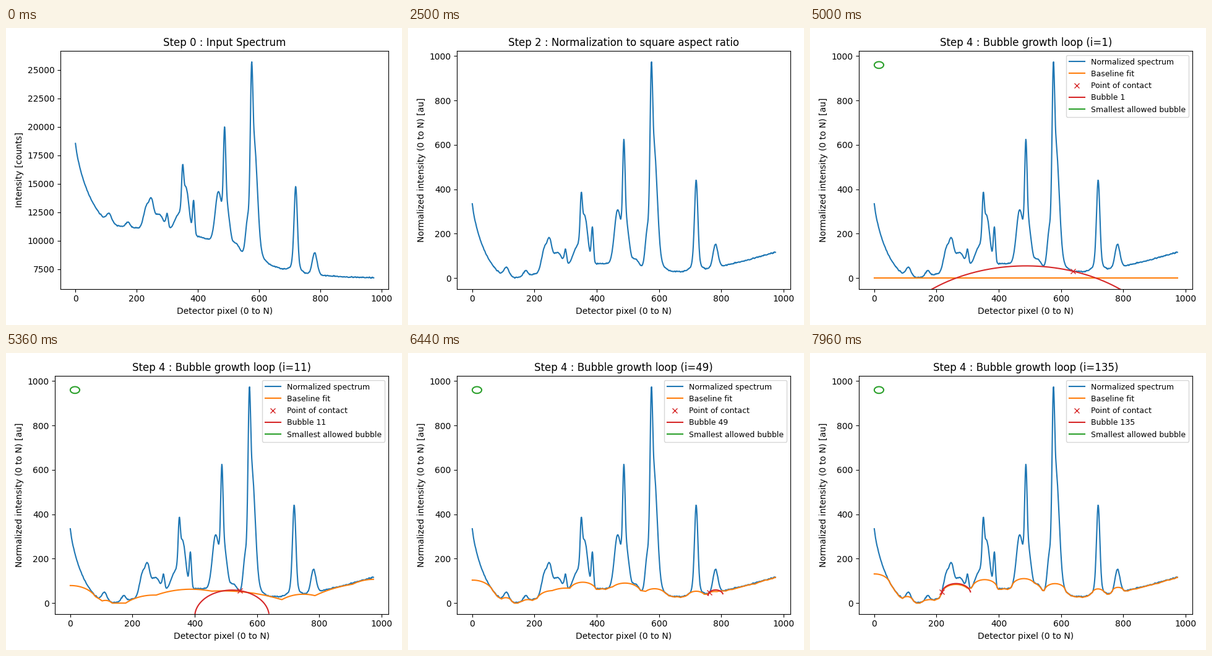
These frames come from a looping animation (640x480 px, 8000 ms). A matplotlib script:

```python
import numpy as np
import matplotlib.pyplot as plt
from matplotlib.animation import FuncAnimation

N = 975
MIN_WIDTH = 30
FRAMES, INTERVAL = 200, 40
STEP_STARTS = [0, 31, 62, 93, 125]
X = np.arange(N)

# Spectral lines: centre, height, sigma
LINES = [(110, 42, 8), (171, 25, 7), (232, 105, 9), (248, 105, 7),
         (272, 75, 16), (299.5, 65, 3.5), (336, 80, 13), (350, 172, 3.3),
         (361, 215, 10), (386, 163, 3.4), (467, 250, 10.5), (487, 390, 3.8),
         (494, 200, 9.5), (525, 36, 10), (561, 130, 6), (575, 560, 4),
         (584, 520, 10), (590, 45, 20), (718, 40, 14), (719.4, 378, 5.3),
         (781.5, 106, 8)]


def make_spectrum():
    """Decaying start, sigmoid background and a sum of Gaussian lines."""
    y = 242 / (1 + np.exp((X - 535) / 90)) + 0.434 * X - 306
    y += 380 * np.exp(-X / 52 - (X / 130) ** 3) + 28 * np.exp(-X / 5)
    for centre, height, sigma in LINES:
        y += height * np.exp(-(X - centre) ** 2 / (2 * sigma ** 2))
    noise = np.random.default_rng(4).normal(0, 1.9, N)
    y += np.convolve(noise, [0.25, 0.5, 0.25], "same")
    y -= y.min()
    return y * (N - 1) / y.max()


def grow_bubble(segment, side):
    n = len(segment)
    radius, middle = {"left": (n, 1), "right": (n, n),
                      "center": (n / 2, n / 2)}[side]
    arc = np.sqrt(np.maximum(radius ** 2 - (np.arange(n) - middle) ** 2, 0))
    gap = segment - arc
    return arc + gap.min(), int(gap.argmin())


def run_bubbles(spectrum):
    """Return (iteration, left, right, contact, arc, baseline) per bubble."""
    baseline = np.zeros(N)
    queue, history = [(0, N)], []
    for iteration, (lo, hi) in enumerate(queue, 1):
        if lo >= hi:
            continue
        side = "center"
        if lo == 0 and hi != N:
            side = "left"
        elif lo != 0 and hi == N:
            side = "right"
        elif hi - lo < MIN_WIDTH:
            continue
        arc, offset = grow_bubble(spectrum[lo:hi], side)
        touch = lo + offset
        history.append((iteration, lo, hi, touch, arc, baseline.copy()))
        baseline[lo:hi] = np.maximum(baseline[lo:hi], arc)
        if touch == lo:
            queue.append((lo + 1, hi))
        else:
            queue += [(lo, touch), (touch, hi)]
    return history


spectrum = make_spectrum()
counts = 18.4 * spectrum + 12388 - 7.99 * X
slope_fit = np.polyval(np.polyfit(X, counts, 1), X)
history = run_bubbles(spectrum)

fig, ax = plt.subplots(figsize=(6.4, 4.8), dpi=100)
state = {"step": None}


def build(step):
    ax.clear()
    raw = step < 2
    ax.set_xlabel("Detector pixel (0 to N)")
    ax.set_ylabel("Intensity [counts]" if raw
                  else "Normalized intensity (0 to N) [au]")
    ax.set_title(["Step 0 : Input Spectrum",
                  "Step 1 : Linear fit of the spectrum",
                  "Step 2 : Normalization to square aspect ratio",
                  "Step 3 : Baseline initialization",
                  "Step 4 : Bubble growth loop (i=1)"][step])
    ax.plot(X, counts if raw else spectrum,
            label="Input spectrum" if raw else "Normalized spectrum")
    if step == 1:
        ax.plot(X, slope_fit, label="Linear fit")
    if step >= 3:
        state["baseline"], = ax.plot(X, 0 * X, label="Baseline fit")
    if step == 4:
        state["contact"], = ax.plot([], [], "x", color="tab:red",
                                    label="Point of contact")
        state["bubble"], = ax.plot([], [], color="tab:red", label="Bubble 1")
        angle = np.linspace(0, 2 * np.pi, 100)
        r = MIN_WIDTH / 2
        ax.plot(r + r * np.cos(angle), N - r + r * np.sin(angle),
                color="tab:green", label="Smallest allowed bubble")
    if not raw:
        limits = -0.05 * (N - 1), 1.05 * (N - 1)
        ax.set(xlim=limits, ylim=limits)
    if step in (1, 3, 4):
        state["legend"] = ax.legend(loc="upper right", fontsize=9)
    fig.tight_layout()
    fig.subplots_adjust(right=618.3 / 640)
    state["step"] = step


def draw(frame):
    step = sum(frame >= start for start in STEP_STARTS) - 1
    if step != state["step"]:
        build(step)
    if step == 4:
        # Skipped narrow bubbles make the counter speed up
        number = round(np.interp(frame - STEP_STARTS[4], [0, 21, 36, 56, 74],
                                 [1, 24, 49, 97, 135]))
        _, lo, hi, touch, arc, baseline = next(
            (h for h in history if h[0] >= number), history[-1])
        state["baseline"].set_ydata(baseline)
        state["contact"].set_data([touch], [spectrum[touch]])
        state["bubble"].set_data(X[lo:hi], arc)
        state["legend"].get_texts()[3].set_text(f"Bubble {number}")
        ax.set_title(f"Step 4 : Bubble growth loop (i={number})")
    return []


anim = FuncAnimation(fig, draw, frames=FRAMES, interval=INTERVAL, repeat=True,
                     repeat_delay=0)
plt.show()
```
